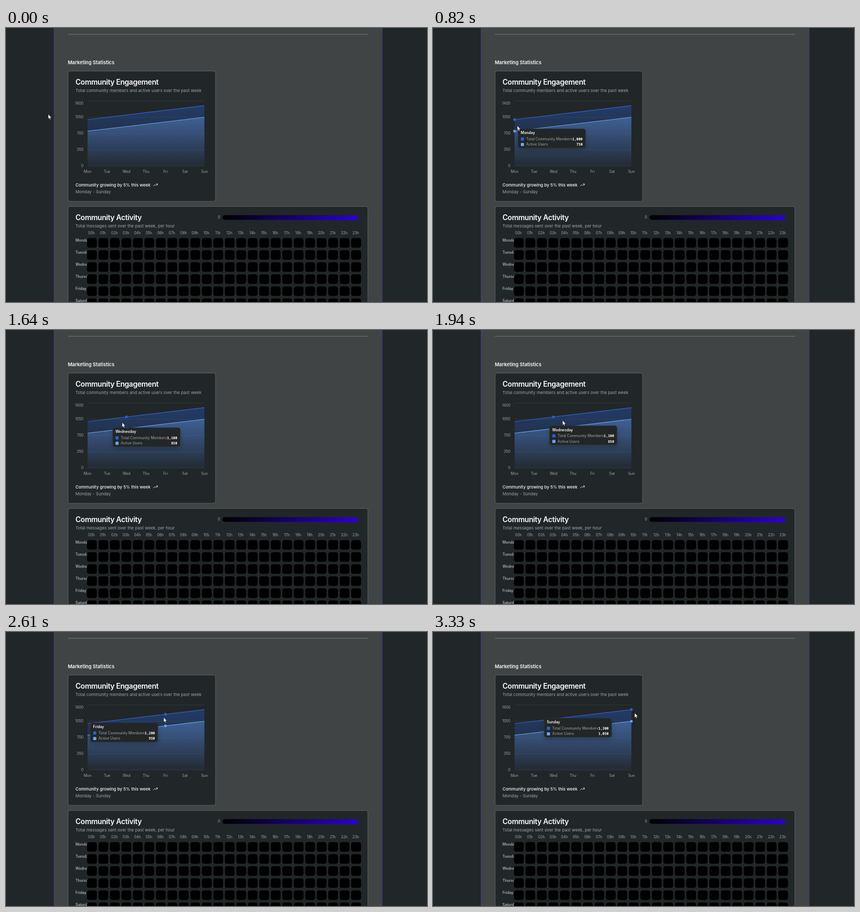
These frames come from a looping animation (800 by 522 pixels, 3.36 s). An HTML page:

```html
<!DOCTYPE html>
<html lang="en">
<head>
<meta charset="utf-8">
<title>Marketing Statistics</title>
<style>
  html, body { margin: 0; width: 100%; height: 100%; overflow: hidden; background: #212628; }
  svg { display: block; width: 800px; height: 522px; font-family: Inter, sans-serif; }
  .title { font-size: 13.8px; font-weight: 600; letter-spacing: -0.025em; fill: #fafafa; }
  .sub { font-size: 8.02px; fill: #9fa3a5; }
  .tick { font-size: 6.9px; fill: #a3a7a9; }
  .day { font-size: 6.9px; font-weight: 600; fill: #a9adaf; }
  .card { fill: #212628; stroke: #62686a; stroke-width: .9; }
  .num { font: 600 6.5px "Noto Sans Mono", monospace; fill: #fafafa; text-anchor: end; }
</style>
</head>
<body>
<svg id="stage" viewBox="0 0 800 522" xmlns="http://www.w3.org/2000/svg">
  <defs>
    <linearGradient id="fillAll" x1="0" y1="0" x2="0" y2="1">
      <stop offset=".05" stop-color="#2662d9" stop-opacity=".33"/>
      <stop offset=".95" stop-color="#2662d9" stop-opacity=".04"/>
    </linearGradient>
    <linearGradient id="fillActive" x1="0" y1="0" x2="0" y2="1">
      <stop offset=".05" stop-color="#6ea3f2" stop-opacity=".36"/>
      <stop offset=".95" stop-color="#6ea3f2" stop-opacity=".04"/>
    </linearGradient>
    <linearGradient id="scale">
      <stop offset="0" stop-color="#000"/>
      <stop offset="1" stop-color="#2b00d4"/>
    </linearGradient>
    <filter id="shadow" x="-20%" y="-30%" width="140%" height="190%">
      <feDropShadow dx="0" dy="4" stdDeviation="4" flood-opacity=".2"/>
    </filter>
  </defs>

  <rect width="800" height="522" fill="#212628"/>
  <rect x="90" width="626" height="522" fill="#404444"/>
  <rect x="90" width="1" height="522" fill="#2d2570"/>
  <rect x="715" width="1" height="522" fill="#2d2570"/>
  <rect x="118" y="11.5" width="570" height="1" fill="#747a7b"/>
  <text x="117.4" y="69" font-size="9.2" font-weight="600" fill="#fafafa">Marketing Statistics</text>

  <rect class="card" x="118" y="82" width="280.2" height="248.2" rx="3.5"/>
  <text class="title" x="132" y="107.8">Community Engagement</text>
  <text class="sub" x="132" y="121.8">Total community members and active users over the past week</text>
  <g id="chart"></g>
  <text x="132" y="301.8" font-size="8.02" font-weight="500" fill="#fafafa">Community growing by 5% this week</text>
  <path transform="translate(279.3 294.4) scale(.383)" d="M22 7L13.5 15.5L8.5 10.5L2 17M16 7H22V13"
    fill="none" stroke="#fafafa" stroke-width="2.2" stroke-linecap="round" stroke-linejoin="round"/>
  <text class="sub" x="132" y="315">Monday - Sunday</text>

  <rect class="card" x="118" y="340" width="569.7" height="220" rx="3.5"/>
  <text class="title" x="132" y="365.8">Community Activity</text>
  <text class="sub" x="132" y="380">Total messages sent over the past week, per hour</text>
  <text class="tick" x="402.5" y="363.3">0</text>
  <rect x="411.3" y="356.4" width="258.3" height="9" rx="4.5" fill="url(#scale)"/>
  <g id="heat"></g>

  <g id="hover">
    <circle id="dotAll" r="2.5" fill="#2c62dc"/>
    <circle id="dotActive" r="2.5" fill="#6ea3f2"/>
    <g id="tip">
      <rect width="128.4" height="36.6" rx="4.4" fill="#212628" stroke="#343a3d" stroke-width=".6" filter="url(#shadow)"/>
      <text id="tipDay" x="5.2" y="10.2" font-size="6.9" font-weight="600" fill="#fafafa"></text>
      <rect x="5.3" y="16.5" width="6" height="6" rx="1.1" fill="#2662d9"/>
      <rect x="5.3" y="26.9" width="6" height="6" rx="1.1" fill="#6ea3f2"/>
      <text class="tick" x="15.4" y="22">Total Community Members</text>
      <text class="tick" x="15.4" y="32.4">Active Users</text>
      <text id="numAll" class="num" x="122.7" y="22"></text>
      <text id="numActive" class="num" x="122.7" y="32.4"></text>
    </g>
  </g>
  <path id="mouse" d="M0 0V9.4L2.1 7.5L3.6 10.8L5.1 10.1L3.7 6.9H6.5Z" fill="#fff" stroke="#000" stroke-width=".6"/>
</svg>
<script>
  const $ = id => document.getElementById(id);
  const DAYS = ['Monday', 'Tuesday', 'Wednesday', 'Thursday', 'Friday', 'Saturday', 'Sunday'];
  const LOOP = 3360, LEFT = 155, STEP = 37, RIGHT = LEFT + 6 * STEP, BASE = 263;
  const TIP_W = 128.4, GAP = 6, RATE = 0.0028;

  const dayX = i => LEFT + STEP * i;
  const valY = v => BASE - v * 31 / 350;
  const total = i => 1000 + 50 * i;
  const active = i => 750 + 50 * i;

  function drawChart() {
    let s = '';
    for (let v = 0; v <= 1400; v += 350) {
      const y = valY(v);
      s += `<rect x="${LEFT}" y="${y - .3}" width="${RIGHT - LEFT}" height=".6" fill="#62686a" opacity=".4"/>`;
      s += `<text class="tick" text-anchor="end" x="147.2" y="${Math.max(y, 143.6) + 2.1}">${v}</text>`;
    }
    const area = (f, fill, color) => {
      const line = `M${LEFT} ${valY(f(0))}L${RIGHT} ${valY(f(6))}`;
      return `<path d="${line}V${BASE}H${LEFT}Z" fill="url(#${fill})"/>` +
        `<path d="${line}" stroke="${color}" stroke-width="1.1"/>`;
    };
    s += area(total, 'fillAll', '#2c60dc') + area(active, 'fillActive', '#6ea3f2');
    DAYS.forEach((d, i) => {
      s += `<text class="tick" text-anchor="middle" x="${dayX(i)}" y="276">${d.slice(0, 3)}</text>`;
    });
    $('chart').innerHTML = s;
  }

  function drawHeat() {
    let s = '';
    for (let r = 0; r < 6; r++) s += `<text class="day" x="132" y="${407 + 23 * r}">${DAYS[r]}</text>`;
    for (let h = 0; h < 24; h++) {
      const x = 153.9 + 21.83 * h;
      s += `<text class="tick" text-anchor="middle" x="${x + 8.6}" y="393.4">${String(h).padStart(2, '0')}h</text>`;
      for (let r = 0; r < 6; r++)
        s += `<rect x="${x}" y="${400.2 + 23 * r}" width="18.6" height="18.4" rx="4.2"/>`;
    }
    $('heat').innerHTML = s;
  }

  // Pointer path: time, x, y
  const PATH = [
    [0, 80, 164], [280, 128, 180], [550, 155, 186], [820, 160, 186], [1330, 194, 180], [1940, 246, 172],
    [2300, 271, 166], [2840, 320.5, 160], [2940, 335, 158], [3330, 383, 154], [LOOP, 383, 154]
  ];
  const ENTER = 550;

  function pointer(t) {
    let i = 1;
    while (i < PATH.length - 1 && t > PATH[i][0]) i++;
    const [t0, x0, y0] = PATH[i - 1], [t1, x1, y1] = PATH[i];
    const k = (t - t0) / (t1 - t0);
    return { x: x0 + (x1 - x0) * k, y: y0 + (y1 - y0) * k };
  }

  const dayAt = x => Math.max(0, Math.min(6, Math.round((x - LEFT) / STEP)));

  function tipGoal(t) {
    const p = pointer(t), x = dayX(dayAt(p.x));
    const fits = x + GAP + TIP_W <= RIGHT;
    return { x: fits ? x + GAP + .6 : x - GAP - TIP_W, y: p.y + GAP };
  }

  // The tooltip trails its goal with a constant rate.
  function tipAt(t) {
    const pos = tipGoal(ENTER);
    for (let u = ENTER; u < t; u += 10) {
      const dt = Math.min(10, t - u), goal = tipGoal(u + dt), k = 1 - Math.exp(-RATE * dt);
      pos.x += (goal.x - pos.x) * k;
      pos.y += (goal.y - pos.y) * k;
    }
    return pos;
  }

  const move = (el, x, y) => el.setAttribute('transform', `translate(${x.toFixed(2)} ${y.toFixed(2)})`);

  function render(t) {
    const p = pointer(t);
    move($('mouse'), p.x, p.y);
    const on = t >= ENTER;
    $('hover').setAttribute('visibility', on ? 'visible' : 'hidden');
    if (!on) return;
    const i = dayAt(p.x), pos = tipAt(t);
    move($('dotAll'), dayX(i), valY(total(i)));
    move($('dotActive'), dayX(i), valY(active(i)));
    move($('tip'), pos.x, pos.y);
    $('tipDay').textContent = DAYS[i];
    $('numAll').textContent = total(i).toLocaleString('en-US');
    $('numActive').textContent = active(i).toLocaleString('en-US');
  }

  drawChart();
  drawHeat();
  const start = performance.now();
  function tick() {
    render((performance.now() - start) % LOOP);
    requestAnimationFrame(tick);
  }
  tick();
</script>
</body>
</html>
```
